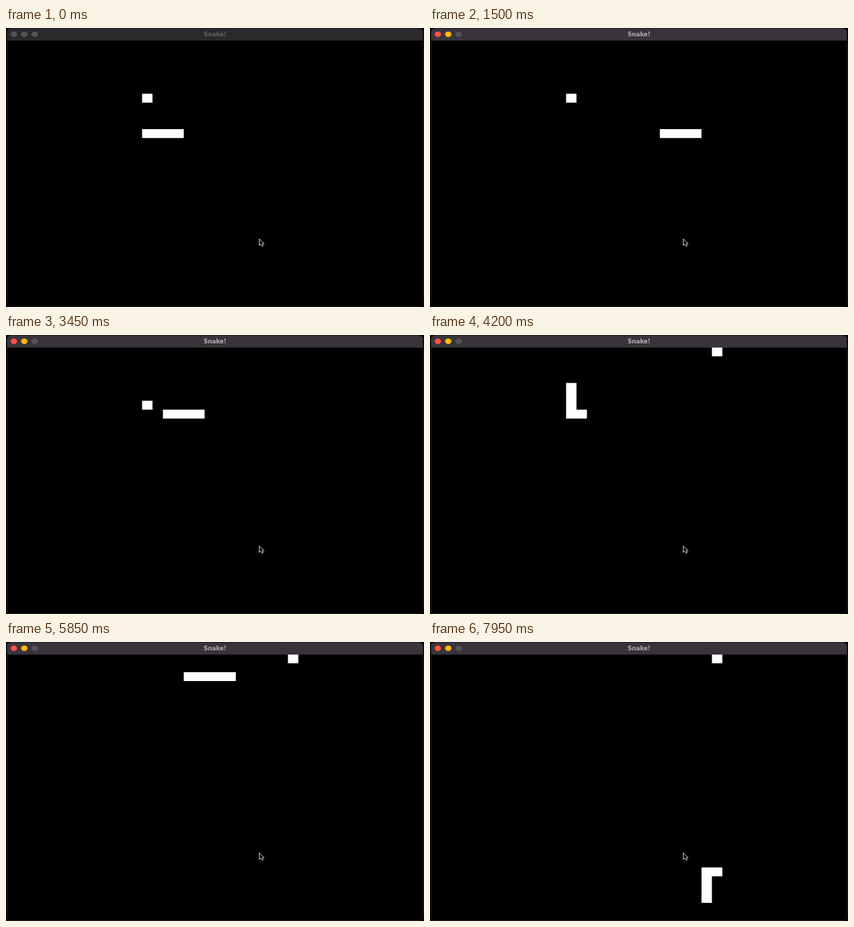
An HTML page that plays this animation: 600x400 px, repeating every 8 s.

```html
<!DOCTYPE html>
<html lang="en">
<head>
<meta charset="utf-8">
<title>Snake!</title>
<style>
  html, body { margin: 0; width: 100%; height: 100%; overflow: hidden; background: #000; }
  svg { display: block; width: 600px; height: 400px; }
  text { font: bold 8.4px "DejaVu Sans", sans-serif; text-anchor: middle; }
  #bar { fill: #39343b; }
  #name { fill: #b3aeb5; }
  #close { fill: #fc4f45; }
  #mini { fill: #fdb90b; }
  #zoom { fill: #565158; }
  .idle #bar { fill: #2a2a2c; }
  .idle #name { fill: #626064; }
  .idle #close, .idle #mini, .idle #zoom { fill: #565358; }
</style>
</head>
<body>
<svg id="stage" class="idle" viewBox="0 0 600 400">
  <rect width="600" height="400"/>
  <path id="bar" d="M1 17.9V7Q1 1 7 1H593Q599 1 599 7V17.9Z"/>
  <rect x="1.5" y=".5" width="597" height="399" rx="6" fill="none" stroke="#1f1f24"/>
  <ellipse id="close" cx="11.3" cy="9" rx="4.6" ry="4"/>
  <ellipse id="mini" cx="26.2" cy="9" rx="4.6" ry="4"/>
  <ellipse id="zoom" cx="41.2" cy="9" rx="4.6" ry="4"/>
  <text id="name" x="300" y="12">Snake!</text>
  <path id="cells" fill="#fff"/>
  <path d="M363.5 302.5V311.5L365.7 309.8L367.4 312.9L369.2 312.2L367.8 309.2H370.6Z"
        fill="#000" stroke="#dcdce4" stroke-width=".9"/>
</svg>
<script>
  const LOOP = 8000, TICK = 150, COLS = 40, ROWS = 30;
  const LEFT = 1, RIGHT = 599, TOP = 17.9, BOTTOM = 399.5;
  const DIRS = { R: [1, 0], L: [-1, 0], U: [0, -1] };
  const ROUTE = "R9 U3 L12 U5 R13 U8 R1";
  const FOOD = [[13, 6], [27, 0]];
  const START = 4;

  const stage = document.getElementById("stage");
  const cells = document.getElementById("cells");

  // Every square the head visits, beginning with the resting body.
  const trail = [[13, 10], [14, 10], [15, 10], [16, 10]];
  for (const leg of ROUTE.split(" ")) {
    const [dx, dy] = DIRS[leg[0]];
    for (let i = +leg.slice(1); i > 0; i--) {
      const [x, y] = trail[trail.length - 1];
      trail.push([x + dx, (y + dy + ROWS) % ROWS]);
    }
  }
  const meal = trail.findIndex(([x, y]) => x === FOOD[0][0] && y === FOOD[0][1]) - START + 1;

  const colX = c => LEFT + c * (RIGHT - LEFT) / COLS;
  const rowY = r => TOP + r * (BOTTOM - TOP) / ROWS;
  const square = ([x, y]) =>
    `M${colX(x)} ${rowY(y)}H${colX(x + 1)}V${rowY(y + 1)}H${colX(x)}Z`;

  // The game rests for one tick at the start and one at 5100 ms.
  const stepAt = t => Math.max(0, Math.floor(t / TICK) - (t < 5100 ? 1 : 2));

  function draw() {
    const t = performance.now() % LOOP;
    const step = stepAt(t);
    const fed = step >= meal;
    const end = step + START;
    const body = trail.slice(end - START - (fed ? 1 : 0), end);
    cells.setAttribute("d", [...body, FOOD[fed ? 1 : 0]].map(square).join(""));
    stage.setAttribute("class", t < 300 ? "idle" : "");
    requestAnimationFrame(draw);
  }
  draw();
</script>
</body>
</html>
```
